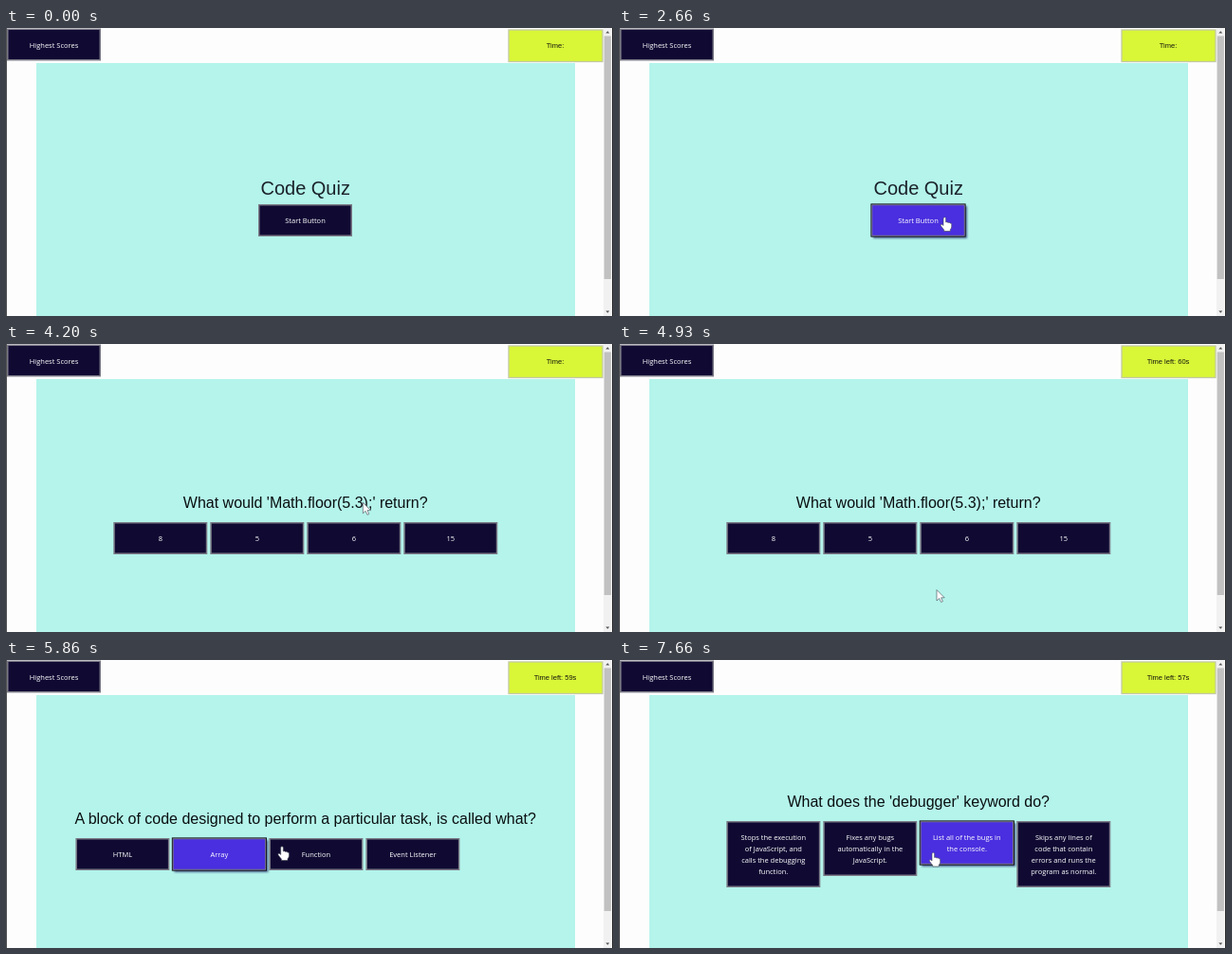
These frames come from a looping animation (640 px wide and 304 px high, 8 s). An HTML page:

```html
<!DOCTYPE html>
<html lang="en">
<head>
<meta charset="utf-8">
<title>Code Quiz</title>
<style>
  html, body { margin: 0; width: 100%; height: 100%; overflow: hidden; background: #fdfdfd; }
  svg { display: block; width: 640px; height: 304px; }
  text { text-anchor: middle; }
  .label { font: 7.5px "Open Sans", "Noto Sans", sans-serif; fill: #fff; }
  .arial { font-family: "Liberation Sans", Arial, sans-serif; }
  .shadow { fill: #27306e; filter: blur(1px); }
</style>
</head>
<body>
<svg id="stage" viewBox="0 0 640 304"></svg>
<script>
const LOOP = 8000;
const MID = 315.7;
const DARK = [16, 10, 51];
const BLUE = [73, 47, 223];
const stage = document.getElementById("stage");

function add(parent, tag, attrs, content) {
  const node = document.createElementNS("http://www.w3.org/2000/svg", tag);
  for (const key in attrs) node.setAttribute(key, attrs[key]);
  if (content !== undefined) node.textContent = content;
  parent.appendChild(node);
  return node;
}

function rect(parent, x, y, width, height, fill, more) {
  return add(parent, "rect", { x, y, width, height, fill, ...more });
}

const clamp = v => Math.max(0, Math.min(1, v));
const ramp = (t, start, length) => clamp((t - start) / length);
const mix = (a, b, k) => `rgb(${a.map((v, i) => Math.round(v + (b[i] - v) * k))})`;

// A quiz button; lines grow it by 12px each. Returns a setter for its state.
function button(parent, x, y, lines) {
  const w = 99, h = 22 + 12 * lines.length;
  const g = add(parent, "g", {});
  const shadow = rect(g, x + 2, y + 2, w, h, "#27306e", { class: "shadow" });
  const ring = rect(g, x - 0.6, y - 0.6, w + 1.2, h + 1.2, "#0c0c14");
  const face = rect(g, x + 0.75, y + 0.75, w - 1.5, h - 1.5, "", { stroke: "#7b7a86", "stroke-width": 1.5 });
  lines.forEach((line, i) =>
    add(g, "text", { x: x + w / 2, y: y + 20 + 12 * i, class: "label" }, line));
  return (hover, focus) => {
    face.setAttribute("fill", mix(DARK, BLUE, hover));
    shadow.setAttribute("opacity", hover * 0.75);
    ring.setAttribute("opacity", focus ? 1 : 0);
    face.setAttribute("stroke-width", focus ? 1 : 1.5);
  };
}

function screen(title, size, baseline, color, left, top, labels) {
  const g = add(stage, "g", {});
  add(g, "text", { x: MID, y: baseline, class: "arial", "font-size": size, fill: color }, title);
  const buttons = labels.map((label, i) => button(g, left + 102 * i, top, label.split("|")));
  return { g, buttons };
}

// Page
rect(stage, 0, 0, 640, 304, "#fdfdfd");
rect(stage, 32, 37, 568, 267, "#b4f4eb");
button(stage, 1, 0.5, ["Highest Scores"])(0, false);
rect(stage, 530, 2, 99, 33.5, "#d9f637", { stroke: "#c3c9a2", "stroke-width": 1.3 });
const timer = add(stage, "text", { x: 579, y: 20.8, class: "arial", "font-size": 7.5, fill: "#16180c" });

// Scrollbar and window edges
rect(stage, 630, 0, 8.5, 304, "#f1f1f1");
rect(stage, 630.7, 8.5, 7.2, 256.5, "#c1c1c1");
add(stage, "path", { d: "M632.3 5.5h4l-2 -2.2zM632.3 298.6h4l-2 2.2z", fill: "#505050" });
rect(stage, 0, 0, 0.8, 304, "#2a2a2e");
rect(stage, 639, 0, 1, 304, "#2a2a2e");

const screens = [
  {
    from: 0,
    ...screen("Code Quiz", 20, 176, "#1b2229", 266, 186, ["Start Button"]),
    hover: t => [ramp(t, 260, 330)],
    focus: t => t >= 2660 ? 0 : -1
  },
  {
    from: 2730,
    ...screen("What would 'Math.floor(5.3);' return?", 16, 173, "#0a0f10", 113.3, 188, ["8", "5", "6", "15"]),
    hover: t => [0, ramp(t, 5130, 200), ramp(t, 2730, 200) - ramp(t, 3860, 300), 0],
    focus: t => t >= 5260 ? 1 : -1
  },
  {
    from: 5330,
    ...screen("A block of code designed to perform a particular task, is called what?", 16, 173, "#0a0f10",
      73.4, 188, ["HTML", "Array", "Function", "Event Listener"]),
    hover: t => [0, 1 - ramp(t, 6860, 300), ramp(t, 6990, 260), 0],
    focus: () => 1
  },
  {
    from: 7530,
    ...screen("What does the 'debugger' keyword do?", 16, 155, "#0a0f10", 113.3, 170, [
      "Stops the execution|of JavaScript, and|calls the debugging|function.",
      "Fixes any bugs|automatically in the|JavaScript.",
      "List all of the bugs in|the console.",
      "Skips any lines of|code that contain|errors and runs the|program as normal."
    ]),
    hover: () => [0, 0, 1, 0],
    focus: () => 2
  }
];

// Pointer
const pointer = add(stage, "g", { fill: "#fff", stroke: "#3c4450", "stroke-width": 0.6, "stroke-linejoin": "round" });
const hand = add(pointer, "path", {
  d: "M-1.3 1.2Q0 -.8 1.3 1.2V5.5Q2.6 4.6 3.7 6Q5 5.2 5.8 6.6Q7.2 6.2 7.4 7.8V10.5Q7.2 12 6 13.2V15H-.6V13.6Q-2 12 -4 9.2Q-4.6 7.6 -3 7.8Q-2 8.2 -1.3 9Z"
});
const arrow = add(pointer, "path", { d: "M0 0V11.5L2.7 9L4.6 13L6.4 12.2L4.6 8.3H8.2Z" });

// time, x, y of the pointer's hot spot
const path = [
  [260, 350, 204], [460, 343.3, 199.5], [3529, 343.3, 199.5], [3530, 420, 70],
  [3860, 420, 70], [4530, 335, 259.5], [4990, 335, 259.5], [5260, 264, 198],
  [5700, 264, 198], [5860, 291, 196.5], [6850, 291, 196.5], [7060, 331.3, 203]
];

function pointerAt(t) {
  const next = path.findIndex(p => p[0] > t);
  if (next < 0) return path[path.length - 1].slice(1);
  if (next === 0) return path[0].slice(1);
  const [t0, x0, y0] = path[next - 1];
  const [t1, x1, y1] = path[next];
  const k = ramp(t, t0, t1 - t0);
  const e = k * k * (3 - 2 * k);
  return [x0 + (x1 - x0) * e, y0 + (y1 - y0) * e];
}

function show(node, visible) {
  node.setAttribute("visibility", visible ? "visible" : "hidden");
}

function draw(t) {
  screens.forEach((s, i) => {
    const next = screens[i + 1];
    const on = t >= s.from && (!next || t < next.from);
    s.g.setAttribute("display", on ? "inline" : "none");
    if (!on) return;
    const hover = s.hover(t), focus = s.focus(t);
    s.buttons.forEach((set, n) => set(hover[n], n === focus));
  });

  timer.textContent = t < 4530 ? "Time:" : `Time left: ${60 - Math.floor((t - 4530) / 1000)}s`;

  const [x, y] = pointerAt(t);
  const isArrow = t >= 3600 && t < 5130;
  pointer.setAttribute("transform", `translate(${x} ${y})`);
  show(hand, t >= 260 && !isArrow);
  show(arrow, isArrow);
}

const begin = performance.now();
function tick() {
  draw((performance.now() - begin) % LOOP);
  requestAnimationFrame(tick);
}
tick();
</script>
</body>
</html>
```
